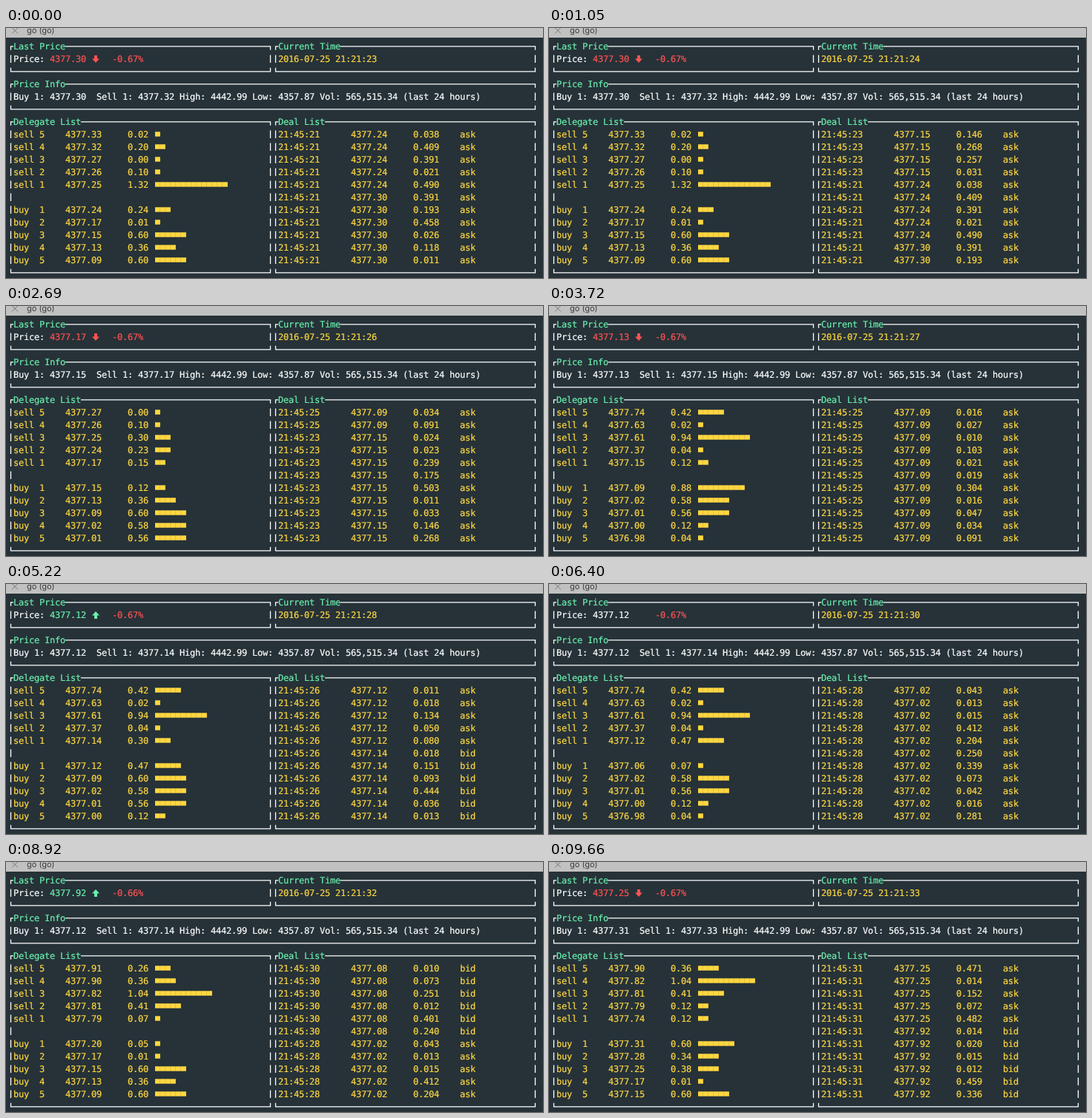
An HTML page for the animation above (9.96 s loop, 724 by 338 pixels).

```html
<!DOCTYPE html>
<html lang="en">
<head>
<meta charset="utf-8">
<title>Ticker terminal</title>
<style>
  html, body { margin: 0; width: 100%; height: 100%; overflow: hidden; background: #263238; }
  svg { display: block; color: #fff; }
  text {
    font: 12px "DejaVu Sans Mono", monospace;
    letter-spacing: -.224px; /* 7px grid */
    white-space: pre;
    text-rendering: geometricPrecision;
    fill: currentColor;
    stroke: currentColor;
    stroke-width: .2;
  }
  .tab { font: 11px Inter, "Liberation Sans", sans-serif; letter-spacing: 0; color: #3c3c3c; stroke: none; }
  .green { color: #69f0ae; }
  .red { color: #ff5252; }
  .yellow { color: #ffd740; }
  .line { fill: none; stroke: #fff; stroke-width: 1.3; }
  .arrow { fill: currentColor; }
</style>
</head>
<body>
<svg id="stage" width="724" height="338" viewBox="0 0 724 338">
  <defs>
    <pattern id="blocks" x="201" width="7" height="7" patternUnits="userSpaceOnUse">
      <rect width="7" height="7" fill="#ffd740"/>
      <rect x="6.5" width=".5" height="7" fill="#c9ad3e"/>
    </pattern>
  </defs>
  <rect width="724" height="338" fill="#263238"/>
  <rect width="724" height="13" fill="#c1c1c1"/>
  <path d="M8 -.5l8 8M16 -.5l-8 8" stroke="#777" fill="none"/>
  <text class="tab" x="28" y="7">go (go)</text>
</svg>
<script>
const LOOP = 9960, TICKS = 67, CELL = 7, ROW = 17;
const OPEN = 4406.8, BASE = 4377; // prices below are cents above BASE
const QUOTE_LEAD = 3;             // quotes arrive this many ticks before the deals
const svg = document.getElementById('stage');

// Market turns: deals so far, their newer and older price, the quotes and the book's edges.
const turns = [
  { tick: 0, count: 0, deal: 24, from: 30, last: 30, move: 'down', bid: 30, buy: 24, sell: 25, above: 26 },
  { tick: 11, count: 11, deal: 15, from: 15, last: 17, move: 'down', bid: 15, buy: 15, sell: 17, above: 24 },
  { tick: 25, count: 22, deal: 9, from: 9, last: 13, move: 'down', bid: 13, buy: 9, sell: 15, above: 37 },
  { tick: 35, count: 33, deal: 12, from: 14, last: 12, move: 'up', bid: 12, buy: 12, sell: 14, above: 37 },
  { tick: 43, count: 44, deal: 2, from: 2, last: 12, move: '', bid: 12, buy: 6, sell: 12, above: 37 },
  { tick: 60, count: 50, deal: 8, from: 8, last: 92, move: 'up', bid: 12, buy: 20, sell: 79, above: 81 },
  { tick: 65, count: 61, deal: 25, from: 92, last: 25, move: 'down', bid: 31, buy: 31, sell: 74, above: 79 }
];

// Resting orders as [price, amount].
const asks = [
  [24, .23], [25, .3], [26, .1], [27, 0], [32, .2], [33, .02], [37, .04], [61, .94],
  [63, .02], [74, .42], [79, .12], [81, .41], [82, 1.04], [90, .36], [91, .26]
];
const bids = [
  [28, .34], [25, .38], [17, .01], [15, .6], [13, .36],
  [9, .6], [2, .58], [1, .56], [0, .12], [-2, .04]
];

const money = cents => (BASE + cents / 100).toFixed(2);
const turnAt = tick => turns.findLast(turn => turn.tick <= tick);
const secondAt = tick => 23 + Math.ceil(tick / 7);
const colX = col => 3 + col * CELL;
const midY = row => 24.5 + row * ROW;

function random(seed) {
  const x = Math.sin(seed * 12.9898 + 4.1) * 43758.5453;
  return x - Math.floor(x);
}

// Deals come in bursts that speed up towards each turn.
function dealCount(tick) {
  const a = turnAt(tick), b = turns[turns.indexOf(a) + 1];
  if (!b) return a.count;
  const u = (tick - a.tick) / (b.tick - a.tick);
  return a.count + Math.floor((b.count - a.count) * u * u);
}

const batchOf = n => turns.find(turn => turn.count >= n);

function dealPrice(n) {
  const batch = batchOf(n);
  return batch.count - n < 5 ? batch.deal : batch.from;
}

function dealSide(n) {
  let older = n;
  while (older > n - 24 && dealPrice(older) === dealPrice(n)) older--;
  return dealPrice(n) > dealPrice(older) ? 'bid' : 'ask';
}

function dealText(n) {
  const second = secondAt(batchOf(n).tick) - 2;
  const amount = (.01 + .5 * random(n) ** 3).toFixed(3);
  return `21:45:${second}      ${money(dealPrice(n))}     ${amount}    ${dealSide(n)}`;
}

function bookAt({ buy, sell, above }) {
  const best = price => [price, .05 + 1.4 * random(price) ** 2];
  const sells = [best(sell), ...asks.filter(([price]) => price >= above)].slice(0, 5);
  const buys = [best(buy), ...bids.filter(([price]) => price < buy)].slice(0, 5);
  return [...sells.reverse(), ...buys];
}

function add(tag, attrs) {
  const el = document.createElementNS('http://www.w3.org/2000/svg', tag);
  for (const name in attrs) el.setAttribute(name, attrs[name]);
  return svg.appendChild(el);
}

function label(col, row, color, content = '') {
  const el = add('text', { x: colX(col), y: midY(row) + 4.6, class: color });
  el.textContent = content;
  return el;
}

function box(left, right, top, bottom, title) {
  const x1 = colX(left) + 3.5, x2 = colX(right) + 3.5;
  const y1 = midY(top) + .3, y2 = midY(bottom) + .3;
  const titleX = colX(left + 1);
  let d = `M${x1} ${y1 + 5}V${y1}H${titleX}M${titleX + title.length * CELL} ${y1}H${x2}v5` +
    `M${x1} ${y2 - 5}V${y2}H${x2}v-5`;
  for (let row = top + 1; row < bottom; row++)
    for (const x of [x1, x2]) d += `M${x} ${midY(row) - 5}v10.5`;
  add('path', { d, class: 'line' });
  label(left + 1, top, 'green', title);
}

box(0, 50, 0, 2, 'Last Price');
box(51, 101, 0, 2, 'Current Time');
box(0, 101, 3, 5, 'Price Info');
box(0, 50, 6, 18, 'Delegate List');
box(51, 101, 6, 18, 'Deal List');

label(1, 1, '', 'Price:');
const price = label(8, 1);
const arrow = add('path', {});
const percent = label(20, 1, 'red');
const clock = label(52, 1, 'yellow');
const info = label(1, 4);
const levels = Array.from({ length: 10 }, (_, i) => {
  const row = 7 + i + (i > 4);
  return {
    name: i < 5 ? `sell ${5 - i}` : `buy  ${i - 4}`,
    text: label(1, row, 'yellow'),
    bar: add('rect', { x: 201, y: midY(row) - 3.2, height: 6.4, fill: 'url(#blocks)' })
  };
});
const dealRows = Array.from({ length: 11 }, (_, i) => label(52, 7 + i, 'yellow'));

const arrows = {
  up: 'M121 37l5 5.5h-3v4.5h-4v-4.5h-3z',
  down: 'M121 47l5-5.5h-3v-4.5h-4v4.5h-3z',
  '': ''
};
const tones = { up: 'green', down: 'red', '': '' };

function draw(t) {
  const tick = Math.floor(t / LOOP * TICKS + .1);
  const turn = turnAt(tick + QUOTE_LEAD);
  const { last, move, bid } = turn;

  price.textContent = money(last);
  price.setAttribute('class', tones[move]);
  arrow.setAttribute('d', arrows[move]);
  arrow.setAttribute('class', `arrow ${tones[move]}`);
  percent.textContent = `${((money(last) / OPEN - 1) * 100).toFixed(2)}%`;
  clock.textContent = `2016-07-25 21:21:${secondAt(tick)}`;
  info.textContent = `Buy 1: ${money(bid)}  Sell 1: ${money(bid + 2)} ` +
    'High: 4442.99 Low: 4357.87 Vol: 565,515.34 (last 24 hours)';

  bookAt(turn).forEach(([cents, amount], i) => {
    const { name, text, bar } = levels[i];
    const blocks = Math.min(20, Math.max(1, Math.ceil(amount * 10)));
    text.textContent = `${name}    ${money(cents)}     ${amount.toFixed(2)}`;
    bar.setAttribute('width', blocks * CELL);
  });

  const newest = dealCount(tick);
  dealRows.forEach((el, i) => { el.textContent = dealText(newest - i); });
}

const start = performance.now();
function run() {
  draw((performance.now() - start) % LOOP);
  requestAnimationFrame(run);
}
run();
</script>
</body>
</html>
```
